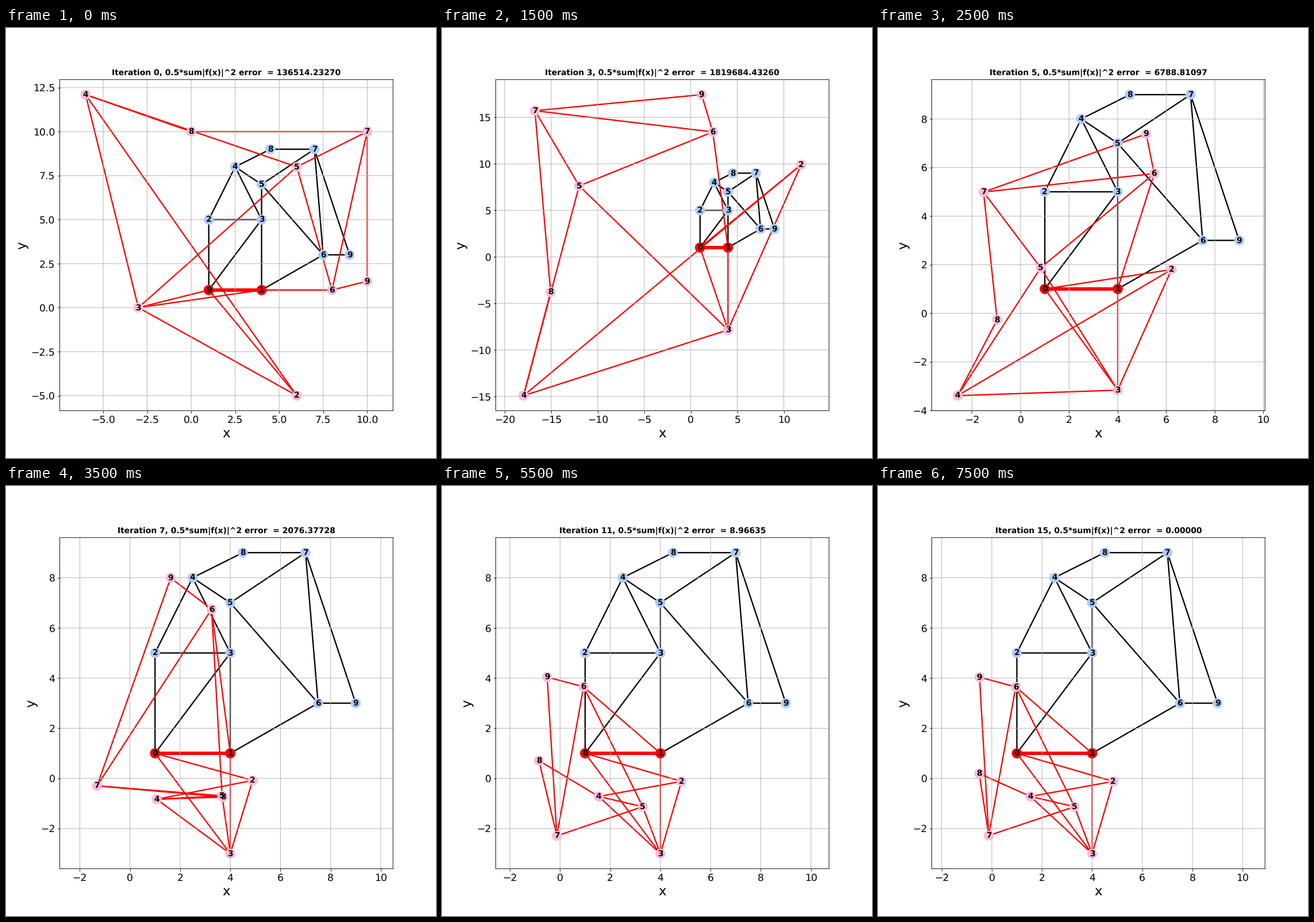
Animation of 748x748 px, one loop 8 s. Source, as a matplotlib script:

```python
import numpy as np
import matplotlib.pyplot as plt
from matplotlib.animation import FuncAnimation
from matplotlib.collections import LineCollection

plt.rcParams.update({"path.snap": False, "text.hinting": "none"})

STEPS = 16
INCHES = 9
BLUE, PINK, RED = "#aecbfa", "#ffbad6", "red"

# Joints 0 and 1 are anchors; every later joint hangs on two others.
ANCHORS = [(1, 1), (4, 1)]
FIXED = len(ANCHORS)
PARENTS = ["03", "01", "23", "34", "15", "56", "47", "67"]
EDGES = np.array([(joint, int(parent))
                  for joint, pair in enumerate(PARENTS, FIXED) for parent in pair])
SHAPE = np.array(ANCHORS + [(1, 5), (4, 5), (2.5, 8), (4, 7),
                            (7.5, 3), (7, 9), (4.5, 9), (9, 3)])
START = np.array(ANCHORS + [(6, -5), (-3, 0), (-6, 12.1), (6, 8),
                            (8, 1), (10, 10), (0, 10), (10, 1.5)])


def squared_lengths(points):
    delta = points[EDGES[:, 0]] - points[EDGES[:, 1]]
    return (delta ** 2).sum(axis=1)


def residual(points):
    return squared_lengths(points) - squared_lengths(SHAPE)


def newton_step(points):
    jacobian = np.zeros((len(EDGES), len(points), 2))
    for row, (a, b) in enumerate(EDGES):
        jacobian[row, a] = 2 * (points[a] - points[b])
        jacobian[row, b] = -jacobian[row, a]
    free = jacobian[:, FIXED:].reshape(len(EDGES), -1)
    moved = points.copy()
    moved[FIXED:] -= np.linalg.solve(free, residual(points)).reshape(-1, 2)
    return moved


poses = [START]
while len(poses) < STEPS:
    poses.append(newton_step(poses[-1]))

fig, ax = plt.subplots(figsize=(INCHES, INCHES), dpi=748 / INCHES)


def draw_graph(points, edge_color, node_color):
    ax.add_collection(LineCollection(points[EDGES], colors=edge_color,
                                     linewidths=2, zorder=1))
    ax.add_collection(LineCollection([points[:FIXED]], colors=RED,
                                     linewidths=5, zorder=1))
    colors = [RED] * FIXED + [node_color] * (len(points) - FIXED)
    ax.scatter(*points.T, s=200, c=colors, linewidths=1, zorder=2)
    for name, (x, y) in enumerate(points):
        ax.text(x, y, str(name), size=12, weight="bold",
                ha="center", va="center", clip_on=True)


def draw(step):
    ax.clear()
    points = poses[step]
    draw_graph(SHAPE, "black", BLUE)
    draw_graph(points, RED, PINK)
    ax.axis("equal")
    ax.grid(True)
    ax.tick_params(labelsize=15)
    ax.set_xlabel("x", fontsize=20)
    ax.set_ylabel("y", fontsize=20)
    error = 0.5 * (residual(points) ** 2).sum()
    ax.set_title(f"Iteration {step}, 0.5*sum|f(x)|^2 error  = {error:.5f}",
                 fontsize=12, fontweight="bold")


anim = FuncAnimation(fig, draw, frames=STEPS, interval=500,
                     init_func=lambda: None, repeat=True, repeat_delay=0)
plt.show()
```
